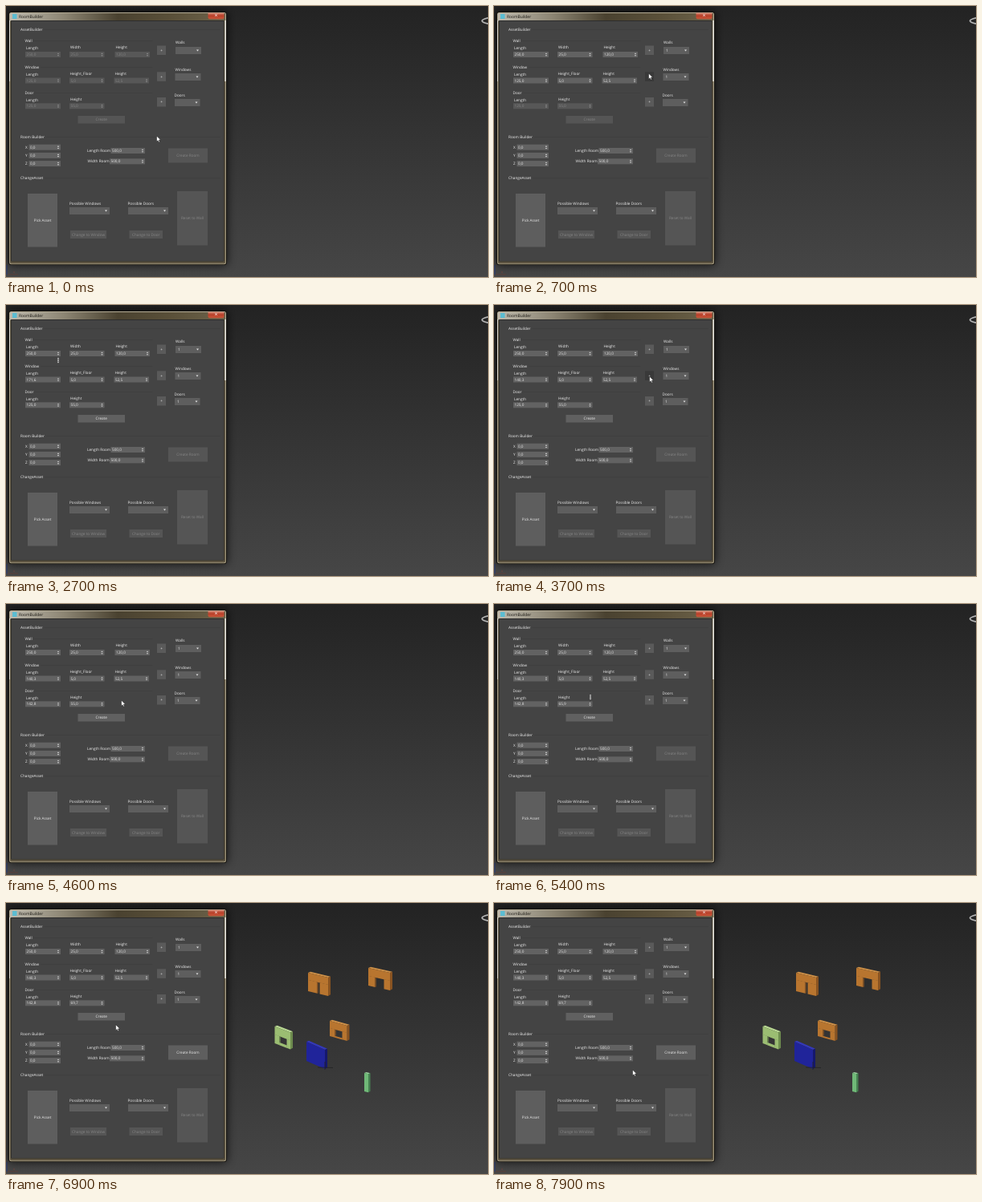
These frames come from a looping animation (600 px wide and 338 px high, 8000 ms). An HTML page with a canvas:

```html
<!DOCTYPE html>
<html lang="en">
<head>
<meta charset="utf-8">
<title>Room tool</title>
<style>
html, body { margin: 0; width: 100%; height: 100%; overflow: hidden; background: #353535; }
canvas { display: block; width: 600px; height: 338px; }
</style>
</head>
<body>
<canvas id="stage" width="600" height="338"></canvas>
<script>
const ctx = document.getElementById('stage').getContext('2d');
const LOOP = 8000;
ctx.textRendering = 'geometricPrecision';

function box(x, y, w, h, fill) {
  ctx.fillStyle = fill;
  ctx.fillRect(x, y, w, h);
}

function round(x, y, w, h, r, fill) {
  ctx.beginPath();
  ctx.roundRect(x, y, w, h, r);
  ctx.fillStyle = fill;
  ctx.fill();
}

function poly(points, fill, stroke) {
  ctx.beginPath();
  points.forEach(([x, y]) => ctx.lineTo(x, y));
  ctx.closePath();
  ctx.fillStyle = fill;
  ctx.fill();
  if (stroke) {
    ctx.strokeStyle = stroke;
    ctx.lineWidth = 0.5;
    ctx.stroke();
  }
}

function text(s, x, y, color = '#f2f2f2', align = 'left', size = 4.7) {
  ctx.font = size + 'px "Open Sans", "Noto Sans", sans-serif';
  ctx.textAlign = align;
  ctx.textBaseline = 'middle';
  ctx.fillStyle = color;
  ctx.fillText(s, x, y + 0.4);
}

function shade(x0, y0, x1, y1, ...colors) {
  const g = ctx.createLinearGradient(x0, y0, x1, y1);
  colors.forEach((c, i) => g.addColorStop(i / (colors.length - 1), c));
  return g;
}

// Each key is [time, ...values]; eased between neighbours.
function track(keys, t) {
  let i = 0;
  while (i < keys.length - 2 && t >= keys[i + 1][0]) i++;
  const [a, b] = [keys[i], keys[i + 1]];
  let p = Math.min(1, Math.max(0, (t - a[0]) / (b[0] - a[0])));
  p = p * p * (3 - 2 * p);
  return a.slice(1).map((v, k) => v + (b[k + 1] - v) * p);
}

const pointer = [
  [0, 188, 166], [260, 193, 55], [400, 193, 55], [600, 193, 88], [720, 193, 88],
  [920, 193, 120], [1030, 193, 120], [1400, 105, 93], [1800, 64, 94], [2000, 64, 94],
  [2700, 65, 69], [3000, 65, 85], [3200, 65, 85], [3600, 194, 93], [3750, 194, 93],
  [4050, 65, 124], [4350, 65, 114], [4600, 144, 124], [4950, 120, 125], [5100, 120, 125],
  [5550, 120, 113], [6100, 131, 146], [6700, 131, 146], [7500, 170, 208], [7900, 173, 212]
];
const windowLength = [[2000, 125], [2700, 171.6], [3050, 140.3]];
const doorLength = [[4080, 125], [4350, 142.8]];
const doorHeight = [[5100, 55], [5550, 69.7]];

const number = v => v.toFixed(1).replace('.', ',');

function field(x, y, w, value, on = true) {
  box(x, y, w, 7, on ? '#626262' : '#575757');
  text(number(value), x + 1.5, y + 3.5, on ? '#e6e6e6' : '#858585');
  const c = on ? '#d8d8d8' : '#959595', r = x + w - 3;
  poly([[r - 1.2, y + 3], [r + 1.2, y + 3], [r, y + 1.4]], c);
  poly([[r - 1.2, y + 4.2], [r + 1.2, y + 4.2], [r, y + 5.8]], c);
}

function button(label, x, y, w, h, on = true, fill = '#5e5e5e') {
  box(x, y, w, h, on ? fill : '#555');
  text(label, x + w / 2, y + h / 2, on ? '#ececec' : '#868686', 'center');
}

function combo(x, y, w, label) {
  box(x, y, w, 9, '#5e5e5e');
  text(label, x + 3, y + 4.4);
  poly([[x + w - 6, y + 3.4], [x + w - 3, y + 3.4], [x + w - 4.5, y + 5.4]], '#e6e6e6');
}

function group(label, x, y, w) {
  box(x, y, w, 0.6, '#3c3c3c');
  ctx.font = '4.7px "Open Sans", "Noto Sans", sans-serif';
  box(x, y - 2, ctx.measureText(label).width + 4, 4, '#444');
  text(label, x + 2, y + 0.3);
}

function backdrop() {
  box(0, 0, 600, 338, shade(0, 0, 0, 338, '#232323', '#464646'));
  // view ring and axis corner
  ctx.lineWidth = 1.7;
  ctx.strokeStyle = '#b4b4b4';
  ctx.beginPath();
  ctx.moveTo(600, 14.8);
  ctx.quadraticCurveTo(585, 18.5, 600, 22.2);
  ctx.stroke();
  box(0.5, 323, 1, 12, '#273a78');
  box(2, 334.5, 13, 0.7, '#633c36');
  text('x', 9, 332, '#85453c', 'left', 4);
}

function frame() {
  ctx.shadowColor = 'rgba(0,0,0,.75)';
  ctx.shadowBlur = 12;
  round(3, 7, 272, 316, 3, '#14120e');
  ctx.shadowBlur = 0;
  round(4, 8, 270, 314.3, 2.5, shade(0, 8, 0, 322, '#b4ac96', '#a89f88', '#a0967c'));
  round(5, 9, 268, 312.3, 2, '#5f5643');
  box(5, 9, 268, 9.5, shade(5, 0, 273, 0, '#bdb9ad', '#8d8674', '#4a4230', '#5a5039', '#6c624a'));
  box(4, 18, 1, 76, '#e2e0da');
  box(272.4, 18, 1.6, 76, '#e8e6e0');
  box(6.2, 18, 265.2, 300.6, '#272727');
  box(7, 18.8, 263.8, 299.2, '#444');
  box(8, 10, 5.5, 6, '#5bbdd2');
  text('RoomBuilder', 16, 13, '#16140f', 'left', 4.95);
  round(251.5, 8.6, 20, 7.6, [0, 0, 2, 2], shade(0, 8, 0, 16, '#dd9885', '#b83f28', '#c9563a'));
  text('×', 261.5, 11.8, '#fff', 'center', 7);
}

function panel(t, [mx, my]) {
  const wall = t >= 330, win = t >= 650, door = t >= 970, done = t >= 6600;
  const plus = y => button('+', 188, y, 11, 11.5, true,
    mx > 188 && mx < 199 && my > y && my < y + 11.5 ? '#393939' : '#5a5a5a');

  group('AssetBuilder', 16, 29, 251);
  group('Wall', 21.5, 43, 161);
  text('Length', 25, 52);
  text('Width', 80, 51.5);
  text('Height', 136.5, 51.5);
  field(24, 57, 44, 250, wall);
  field(79, 57, 43.5, 25, wall);
  field(135.5, 57, 43.5, 120, wall);
  plus(49.5);
  text('Walls', 211, 45.5);
  combo(211, 51, 32, wall ? '1' : '');

  group('Window', 21.5, 76, 161);
  text('Length', 25, 85);
  text('Height_Floor', 79.5, 84.5);
  text('Height', 135.5, 84.5);
  field(24, 89.5, 44, track(windowLength, t)[0], win);
  field(79, 89.5, 43.5, 5, win);
  field(134.5, 89.5, 43.5, 52.5, win);
  plus(82.3);
  text('Windows', 210.5, 79);
  combo(210.5, 84, 32, win ? '1' : '');

  group('Door', 21.5, 108, 161);
  text('Length', 25, 117);
  text('Height', 80, 116.5);
  field(24, 121.3, 44, track(doorLength, t)[0], door);
  field(79, 121.3, 43.5, track(doorHeight, t)[0], door);
  plus(114);
  text('Doors', 209.5, 111);
  combo(210, 116, 31.5, door ? '1' : '');

  const hot = mx > 89 && mx < 148 && my > 137 && my < 147;
  button('Create', 89.5, 137, 58.5, 9.5, door, hot ? '#47689a' : '#606060');

  group('Room Builder', 16, 163, 251);
  ['X', 'Y', 'Z'].forEach((axis, i) => {
    text(axis, 24, 176 + i * 10.3);
    field(28.5, 172.7 + i * 10.2, 39.5, 0);
  });
  text('Length Room', 101, 180.5);
  field(130.5, 177, 42.5, 500);
  text('Width Room', 101.5, 193.7);
  field(129, 190.3, 44, 500);
  button('Create Room', 202, 177.5, 49, 18, done);

  group('ChangeAsset', 16, 214.5, 251);
  button('Pick Asset', 27, 234, 37, 66.5);
  text('Possible Windows', 79, 246);
  combo(79, 251, 50, '');
  text('Possible Doors', 151.5, 246);
  combo(152, 251, 50, '');
  button('Change to Window', 80, 280, 45, 10, false);
  button('Change to Door', 153.5, 280, 41.5, 10, false);
  button('Reset to Wall', 213, 231, 38, 67.5, false);
}

// Slab whose front face slopes down to the right, with an optional opening.
function slab(x, y, w, h, slope, depth, [front, top, side], hole) {
  const k = slope / w, d = depth;
  const at = (u, v) => [x + u, y + v + u * k];
  poly([at(0, 0), [x + d, y - d * 0.45], [x + w + d, y + slope - d * 0.45], at(w, 0)], top);
  poly([at(w, 0), [x + w + d, y + slope - d * 0.45], [x + w + d, y + slope + h - d * 0.6], at(w, h)], side);
  if (!hole) return poly([at(0, 0), at(w, 0), at(w, h), at(0, h)], front);
  const [a, b, c, e] = hole;
  poly([at(0, 0), at(w, 0), at(w, c), at(0, c)], front);
  poly([at(0, c - 0.3), at(a, c - 0.3), at(a, h), at(0, h)], front);
  poly([at(b, c - 0.3), at(w, c - 0.3), at(w, h), at(b, h)], front);
  if (e < h) poly([at(a - 0.3, e), at(b + 0.3, e), at(b + 0.3, h), at(a - 0.3, h)], front);
  poly([at(a, c), at(a + 1.2, c), at(a + 1.2, e - 0.6), at(a, e)], side);
}

function scene() {
  const orange = ['#b8752f', '#cf9148', '#885321'];
  const green = ['#9bbd72', '#b9d893', '#6d8b4e'];
  slab(376, 87, 25, 23, 6, 3, orange, [11.5, 14.5, 9, 23]);
  slab(451, 81, 27, 22, 6, 3, orange, [8.5, 19.5, 10, 22]);
  slab(334.5, 154, 19.5, 21, 7.5, 3, green, [6, 15, 10, 17.5]);
  slab(403, 147, 21.5, 19, 6, 3, orange, [6.5, 15.5, 9, 17]);
  slab(374, 173, 23, 24, 10, 3, ['#20249a', '#3439ba', '#15186d']);
  slab(446, 212, 5, 23, 1.3, 2.5, ['#70b978', '#9bd49f', '#478252']);
  ctx.lineWidth = 0.8;
  ctx.strokeStyle = '#222';
  ctx.beginPath();
  ctx.moveTo(388, 205);
  ctx.lineTo(407, 205.5);
  ctx.moveTo(397, 208);
  ctx.lineTo(397, 198);
  ctx.stroke();
}

function cursor(t, [x, y]) {
  const drag = t > 1850 && t < 3150 || t > 4060 && t < 4370 || t > 5050 && t < 5570;
  if (drag) {
    box(x - 0.5, y - 2.5, 1, 5, '#fff');
    poly([[x - 1.7, y - 1.5], [x + 1.7, y - 1.5], [x, y - 3.7]], '#fff', '#222');
    poly([[x - 1.7, y + 1.5], [x + 1.7, y + 1.5], [x, y + 3.7]], '#fff', '#222');
    return;
  }
  const shape = [[0, 0], [0, 7.2], [1.6, 5.7], [2.7, 8], [3.9, 7.4], [2.9, 5.2], [5, 5.1]];
  poly(shape.map(([a, b]) => [x - 0.5 + a, y - 4 + b]), '#fff', '#1a1a1a');
}

function draw(now) {
  const t = Math.floor(now % LOOP / 100) * 100;
  const p = track(pointer, t);
  backdrop();
  if (t >= 6600) scene();
  frame();
  panel(t, p);
  cursor(t, p);
  requestAnimationFrame(draw);
}
requestAnimationFrame(draw);
</script>
</body>
</html>
```
